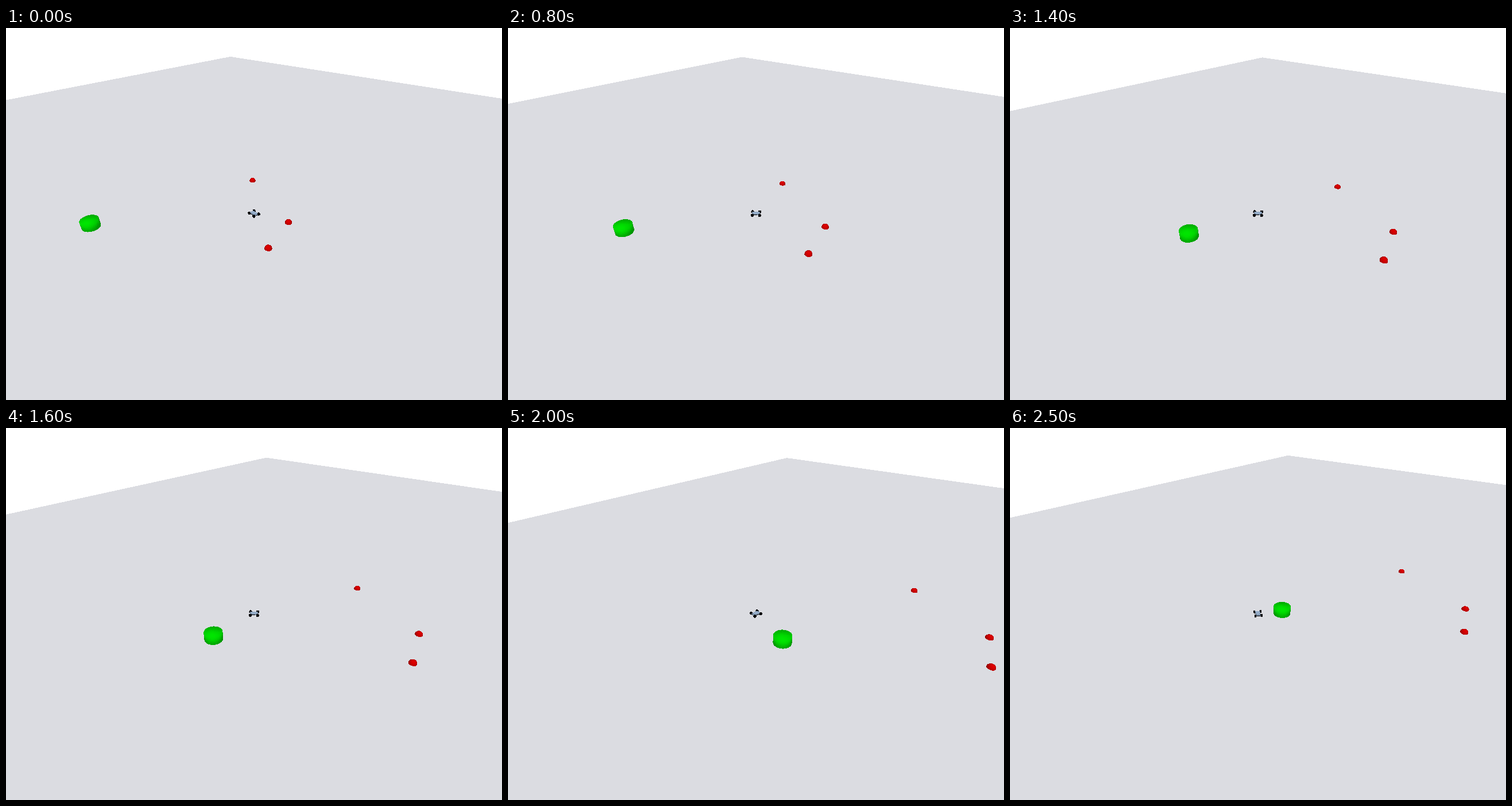
Recreate the animation shown at these times as a matplotlib script. Size 864 by 648 pixels, loop 2.6 s.

```python
import numpy as np
import matplotlib.pyplot as plt
from matplotlib.animation import FuncAnimation
from matplotlib.collections import PolyCollection

W, H, DPI = 864, 648, 100
FRAMES, INTERVAL = 26, 100

# Chase camera: looks down at the car from a fixed distance.
# Ground coordinates are (right, away, up) relative to the start of the car.
FOCAL = H / 2 / np.tan(np.radians(30))
DISTANCE = 7.5
SIN, COS = np.sin(np.radians(35)), np.cos(np.radians(35))
LIGHT = np.array([0, -0.5, 0.86])

GROUND = np.array([219, 220, 225]) / 255
RED, GREEN = np.array([0.98, 0, 0]), np.array([0, 1.0, 0])
BLUE, BLACK = np.array([148, 172, 200]) / 255, np.array([0.02, 0.02, 0.03])

BALLS = [(-0.039, 1.575), (0.772, -0.338), (0.288, -1.215)]
BALL_RADIUS = 0.0725
GOAL, GOAL_RADIUS, GOAL_HEIGHT = (-3.588, -0.48), 0.19, 0.175
CORNER_DISTANCE, CORNER_ANGLE = 21.04, np.radians(4.93)

# Drift of the scene relative to the car, and the heading of the car.
TIMES = np.array([0, 4, 8, 12, 16, 20, 21, 22, 23, 24, 25])
DRIFT_U = [0, .192, .748, 1.597, 2.744, 4.133, 4.44, 4.63, 4.62, 4.44, 4.147]
DRIFT_V = [0, -.098, -.17, -.28, -.425, -.543, -.50, -.24, .16, .50, .524]
HEADING_TIMES = [0, 3, 16, 20, 25]
HEADINGS = [130, 178, 178, 215, 278]


def hermite(t, times, values):
    values = np.asarray(values, float)
    slopes = np.gradient(values, times)
    slopes[0] = 0
    i = min(np.searchsorted(times, t, side="right") - 1, len(times) - 2)
    span = times[i + 1] - times[i]
    s = (t - times[i]) / span
    return ((2 * s**3 - 3 * s**2 + 1) * values[i]
            + (s**3 - 2 * s**2 + s) * span * slopes[i]
            + (3 * s**2 - 2 * s**3) * values[i + 1]
            + (s**3 - s**2) * span * slopes[i + 1])


def project(points):
    u, v, z = np.moveaxis(np.asarray(points, float), -1, 0)
    depth = DISTANCE + v * COS - z * SIN
    return np.stack([W / 2 + FOCAL * u / depth,
                     H / 2 - FOCAL * (v * SIN + z * COS) / depth], -1)


def revolve(radius, z, normal_r, normal_z, segments=32):
    """Quads and their normals for a profile turned about the vertical axis."""
    a = np.linspace(0, 2 * np.pi, segments + 1)[:, None]

    def turn(r, up):
        return np.stack([r * np.cos(a), r * np.sin(a), up + 0 * a], -1)

    def quads(g):
        return np.stack([g[:-1, :-1], g[1:, :-1], g[1:, 1:], g[:-1, 1:]], 2).reshape(-1, 4, 3)

    normals = quads(turn(normal_r, normal_z)).mean(1)
    normals /= np.linalg.norm(normals, axis=1, keepdims=True)
    return quads(turn(radius, z)), normals


def dome_mesh(radius):
    a = np.linspace(0, np.pi / 2, 6)
    return revolve(radius * np.sin(a), radius * np.cos(a), np.sin(a), np.cos(a), 18)


def drum_mesh(radius, height):
    s = np.linspace(0, 2, 11)

    def along(*keys):
        return np.interp(s, [0, 1, 2], keys)

    return revolve(along(0, radius, radius), along(height, height, 0),
                   along(0, 0.7, 1), along(1, 0.7, -0.3))


DOME = dome_mesh(BALL_RADIUS)
DRUM = drum_mesh(GOAL_RADIUS, GOAL_HEIGHT)


def solid(mesh, place, color):
    quads, normals = mesh
    flat = project(quads + np.array([*place, 0]))
    x, y = flat[..., 0], flat[..., 1]
    area = (x * np.roll(y, -1, 1) - y * np.roll(x, -1, 1)).sum(1)
    shade = 0.58 + 0.32 * np.clip(normals @ LIGHT, 0, 1)
    return [(p, color * k) for p, k, a in zip(flat, shade, area) if a > 0]


def ground(du, dv):
    u = CORNER_DISTANCE * np.sin(CORNER_ANGLE)
    v = CORNER_DISTANCE * np.cos(CORNER_ANGLE)
    corners = np.array([(-v, -u, 0), (-u, v, 0), (v, u, 0)]) + (du, dv, 0)
    return [(np.vstack([project(corners), (3000, 900), (-3000, 900)]), GROUND)]


def car(heading):
    c, s = np.cos(np.radians(heading)), np.sin(np.radians(heading))

    def place(points):
        x, y, z = np.moveaxis(np.asarray(points, float), -1, 0)
        return project(np.stack([x * c - y * s, x * s + y * c, z], -1))

    def wheel(x, y):
        a = np.linspace(0, 2 * np.pi, 13)
        rims = [place(np.stack([x + 0.027 * np.cos(a), y + w + 0 * a,
                                0.012 + 0.027 * np.sin(a)], -1)) for w in (-0.012, 0.012)]
        tread = [np.array([rims[0][i], rims[0][i + 1], rims[1][i + 1], rims[1][i]])
                 for i in range(12)]
        return [(p, BLACK) for p in rims + tread]

    def plate(length, front, back, z, color):
        return [(place([(length, front, z), (length, -front, z),
                        (-length, -back, z), (-length, back, z)]), color)]

    spots = [(x, y) for x in (-0.083, 0.083) for y in (-0.072, 0.072)]
    far = [p for p in spots if p[0] * s + p[1] * c > 0]
    near = [p for p in spots if p not in far]
    parts = [q for p in far for q in wheel(*p)]
    parts += plate(0.084, 0.05, 0.05, 0.005, BLACK)
    parts += plate(0.086, 0.042, 0.05, 0.018, BLUE * 0.82)
    parts += plate(0.055, 0.03, 0.042, 0.035, BLUE)
    return parts + [q for p in near for q in wheel(*p)]


fig = plt.figure(figsize=(W / DPI, H / DPI), dpi=DPI, facecolor="white")
ax = fig.add_axes([0, 0, 1, 1])
ax.set(xlim=(0, W), ylim=(H, 0))
ax.axis("off")
scene = PolyCollection([], linewidths=0, edgecolors="none", antialiaseds=False)
ax.add_collection(scene, autolim=False)


def draw(frame):
    du, dv = hermite(frame, TIMES, DRIFT_U), hermite(frame, TIMES, DRIFT_V)
    parts = ground(du, dv)
    for u, v in BALLS:
        parts += solid(DOME, (u + du, v + dv), RED)
    parts += car(np.interp(frame, HEADING_TIMES, HEADINGS))
    parts += solid(DRUM, (GOAL[0] + du, GOAL[1] + dv), GREEN)
    polygons, colors = zip(*parts)
    scene.set_verts(polygons)
    scene.set_facecolor(colors)
    return [scene]


animation = FuncAnimation(fig, draw, frames=FRAMES, interval=INTERVAL,
                          repeat=True, repeat_delay=0, blit=False)
plt.show()
```
